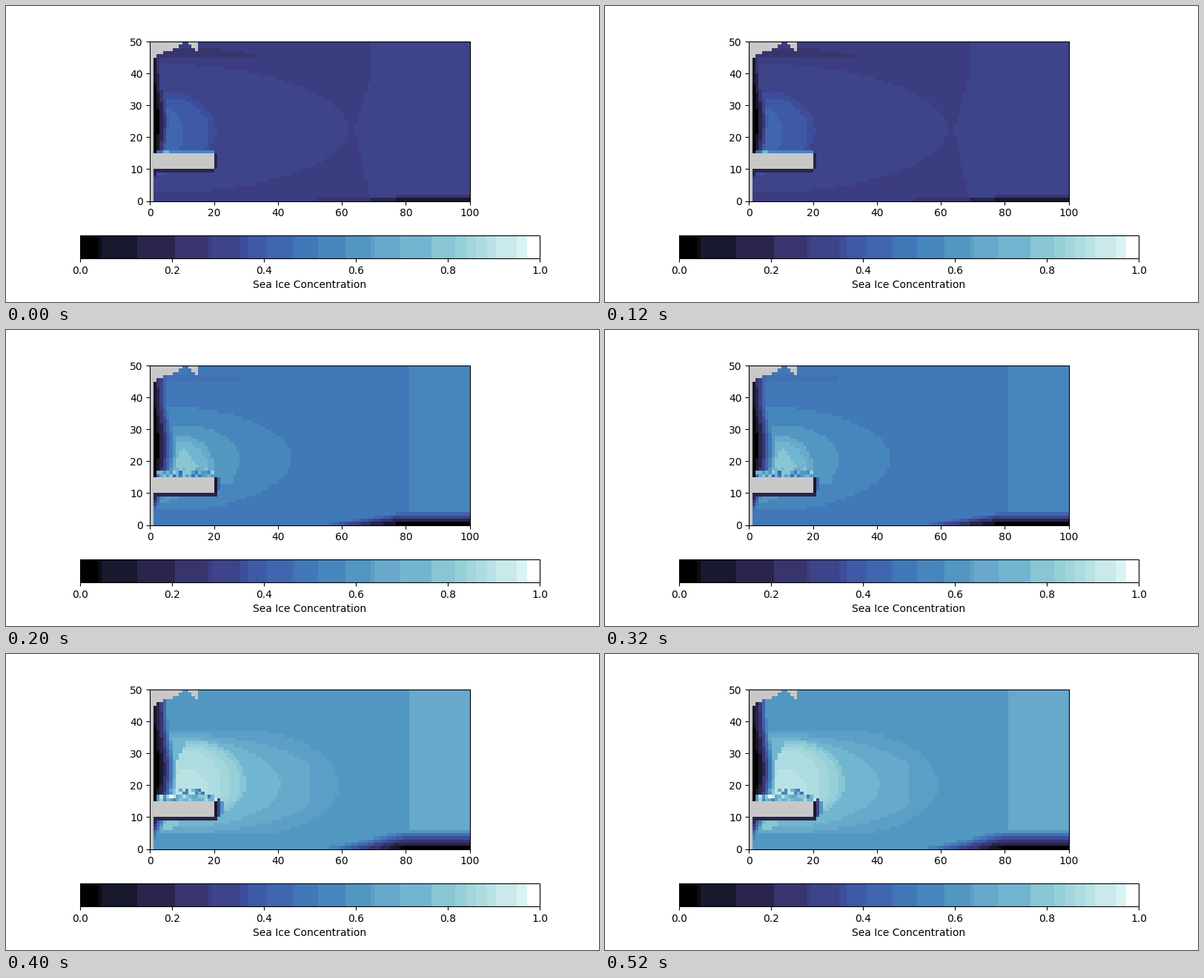
Animation of 800 by 400 pixels, one loop 600 ms. Source, as a matplotlib script:

```python
import numpy as np
import matplotlib.pyplot as plt
from matplotlib.animation import FuncAnimation
from matplotlib.colors import ListedColormap, to_rgb

NX, NY = 100, 50
c, r = np.meshgrid(np.arange(NX) + 0.5, np.arange(NY) + 0.5)

# Upper end of each colour band
BANDS = [
    (0.039, "#000000"), (0.047, "#0b0b15"), (0.124, "#18182e"),
    (0.206, "#29254d"), (0.277, "#38356e"), (0.285, "#3c3d80"),
    (0.348, "#3e4489"), (0.364, "#3d4d9b"), (0.406, "#3e5aa6"),
    (0.461, "#4066af"), (0.468, "#4170b3"), (0.518, "#4178b7"),
    (0.577, "#4786bc"), (0.632, "#5297c2"), (0.640, "#5b9fc6"),
    (0.695, "#67a8cb"), (0.765, "#71b5d0"), (0.816, "#89c6d3"),
    (0.840, "#95cfd8"), (0.861, "#a3d5db"), (0.884, "#addce0"),
    (0.905, "#b9e2e4"), (0.950, "#c9e9ea"), (0.972, "#d9f3f3"),
    (1.001, "#ffffff"),
]


def make_cmap(n=1000):
    ends = [end for end, _ in BANDS]
    rgb = np.array([to_rgb(col) for _, col in BANDS])
    cmap = ListedColormap(rgb[np.searchsorted(ends, (np.arange(n) + 0.5) / n)])
    cmap.set_bad("#c8c8c8")
    return cmap


def box(c0, c1, r0, r1):
    return (c > c0) & (c < c1) & (r > r0) & (r < r1)


def lobe(cx, cy, a, up, down):
    """Right half of an ellipse, continued straight to the left."""
    dx = np.maximum(c - cx, 0) / a
    dy = (r - cy) / np.where(r > cy, up, down)
    return dx**2 + dy**2 < 1


def land_mask():
    land = box(0, 1, 0, 50) | box(0, 20, 10, 15)
    for row, left, right in [(49, 10, 12), (48, 9, 13), (47, 7, 14),
                             (46, 4, 15), (45, 2, 15)]:
        land |= box(0, left, row, row + 1) | box(right, 15, row, row + 1)
    return land


LAND = land_mask()


def open_water(v, lin, quad, cols, shift, slope):
    """Low ice along the west coast and the south-east edge."""
    edge = np.where(r > 15, 0.8 + 1.7 * np.exp(-((r - 25) / 10) ** 2),
                    1 - 0.4 * (9.5 - r))
    d = np.maximum(c - edge, 0)
    coast = np.where(r > 15, lin * d + quad * d**2 + 0.01, 0.17 * d + 0.05)
    v = np.where((r > 15) | (r < 10), np.minimum(v, coast), v)
    south = slope * (r - np.interp(c, cols, shift))
    return np.clip(np.minimum(v, south), 0, 1)


def early():
    v = np.full(c.shape, 0.28)
    k = np.where(r > 22.5, 0.3, 0.22)
    east = c > np.minimum(64 + k * abs(r - 22.5), 68.8)
    v[lobe(0, 22.5, 62, 20.5, 20) | east] = 0.30
    for row, end in [(45, 33), (46, 29), (47, 22)]:
        v[box(2, end, row, row + 1)] = 0.25
    north = r > 15
    v[lobe(5, 22, 15.6, 12.5, 12) & north] = 0.355
    v[lobe(5, 22, 13.5, 10.5, 12) & north] = 0.39
    v[lobe(5, 22, 5, 7, 12) & north] = 0.43
    v[box(2, 5, 8, 9)] = 0.36
    v = open_water(v, 0.13, 0, [50, 52.5, 68.5, 69.5, 76.5, 77.5],
                   [-2, -1.05, -1, -0.6, -0.5, 0.03], 0.17)
    v[box(1, 20, 9, 10)] = 0.2
    v[box(20, 21, 10, 15)] = 0.2
    v[box(2, 20, 15, 16)] = 0.54
    v[box(2, 4, 15, 16)] = 0.45
    v[box(4, 6, 15, 16)] = 0.73
    return v


def middle():
    rng = np.random.default_rng(4)
    v = np.full(c.shape, 0.50)
    v[(c > 81) & (r > 4)] = 0.55
    v[box(3, 28, 45, 47)] = 0.465
    v[lobe(5, 21, 39, 16, 16.5)] = 0.55
    v[lobe(10, 20.5, 18, 11, 11) & (r > 15)] = 0.60
    v[box(20, 26, 13, 15)] = 0.60
    v[lobe(10, 18, 10, 10, 10) & (r > 15)] = 0.66
    v[lobe(10, 16, 8.5, 10, 10) & (r > 15)] = 0.73
    h = 24.5 - r
    v[(r > 15) & (c - 10.5 < 0.7 * h) & (10.5 - c < 0.65 * h)] = 0.80
    v[box(2, 9, 8, 9) | box(2, 6, 7, 8)] = 0.60
    v = open_water(v, 0.12, 0, [52, 78], [-3.5, 0.35], 0.14)
    noise = rng.uniform(0.45, 0.84, v.shape)
    ragged = box(2, 20, 15, 17) | (box(6, 18, 17, 18) & (noise > 0.6))
    v[ragged] = noise[ragged]
    v[box(1, 21, 9, 10)] = 0.18
    v[box(20, 21, 10, 15)] = 0.08
    v[box(21, 22, 11, 15)] = 0.42
    return v


def late():
    rng = np.random.default_rng(9)
    v = np.full(c.shape, 0.61)
    v[(c > 81) & (r > 6)] = 0.66
    v[lobe(30, 20, 29, 17, 15.5)] = 0.636
    v[lobe(8, 20, 46, 16, 15) & (c < 50)] = 0.66
    v[lobe(8, 20, 32.7, 15, 13.5)] = 0.73
    blob = (c > 7 + 0.5 * np.maximum(r - 25, 0)) & ((r > 15) | (c > 20))
    for cx, a, up, down, val in [(14, 16, 14, 10, 0.79), (14, 14.5, 13, 9, 0.83),
                                 (13, 12.5, 12.3, 9, 0.85),
                                 (12, 10.5, 11, 9, 0.875)]:
        v[lobe(cx, 20, a, up, down) & blob] = val
    v[lobe(11, 18, 7, 7, 6) & blob & (r > 15)] = 0.895
    v[box(3, 9, 7, 9) | box(3, 7, 6, 7)] = 0.78
    v = open_water(v, 0.07, 0.012, [54, 79], [-5.2, 0.25], 0.11)
    noise = rng.uniform(0.48, 1.0, v.shape)
    ragged = box(2, 21, 15, 17) | (box(6, 18, 17, 19) & (noise < 0.72))
    v[ragged] = noise[ragged]
    v[box(1, 21, 9, 10)] = 0.18
    v[box(20, 21, 10, 15)] = 0.08
    v[box(21, 22, 10, 16)] = 0.34
    v[box(22, 23, 11, 15)] = 0.58
    return v


STATES = [np.ma.array(f(), mask=LAND) for f in (early, middle, late)]

fig, ax = plt.subplots(figsize=(8, 4), dpi=100)
mesh = ax.pcolormesh(np.arange(NX + 1), np.arange(NY + 1), STATES[0],
                     cmap=make_cmap(), vmin=0, vmax=1)
ax.set_aspect("equal")
ax.set_yticks(range(0, 51, 10))
fig.colorbar(mesh, ax=ax, orientation="horizontal",
             label="Sea Ice Concentration")


def update(i):
    mesh.set_array(STATES[i])
    return [mesh]


anim = FuncAnimation(fig, update, frames=len(STATES), interval=200,
                     repeat=True, repeat_delay=0)
plt.show()
```
